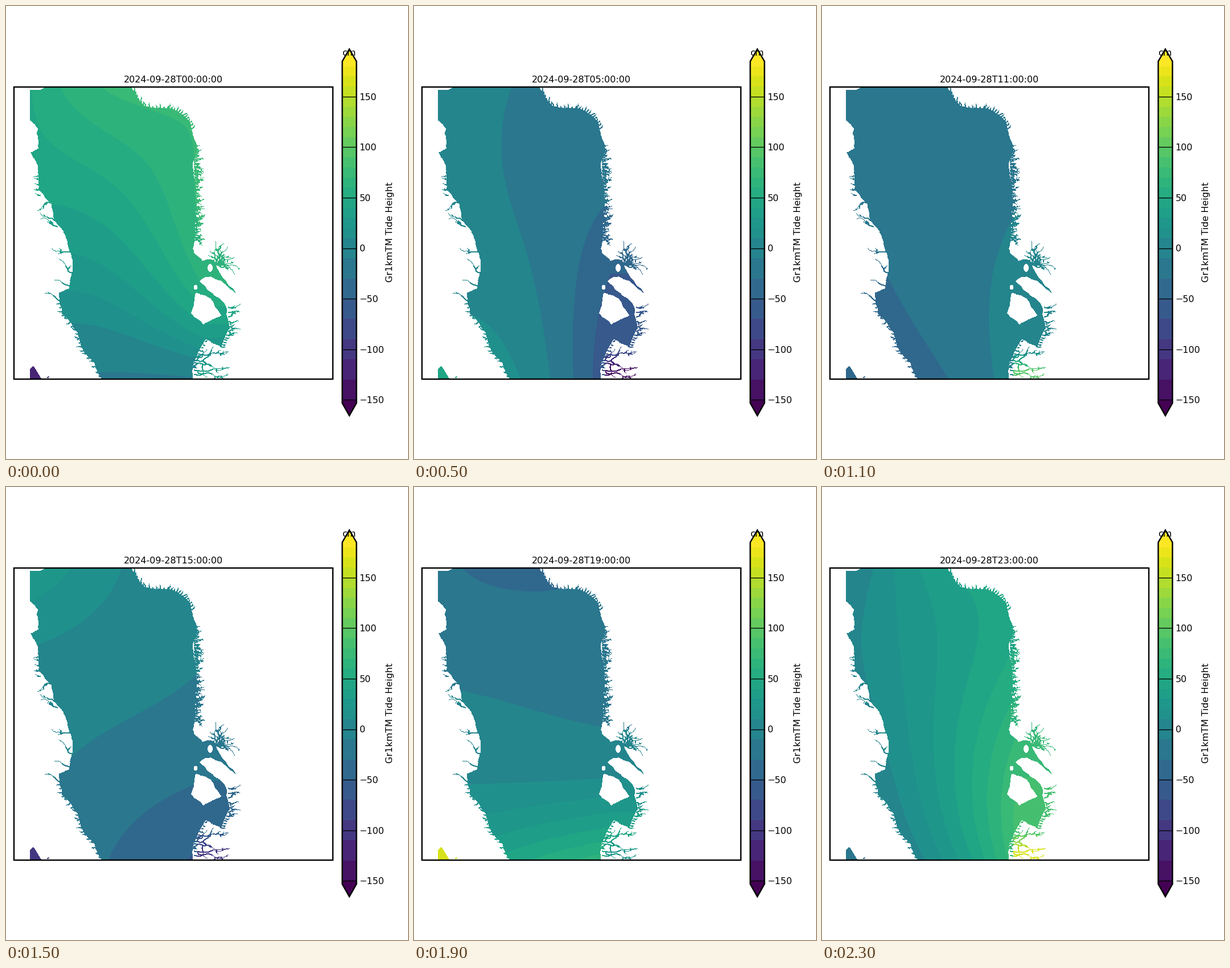
A matplotlib script that plays this animation: 706 px wide and 794 px high, repeating every 2.4 s.

```python
import numpy as np
import matplotlib.pyplot as plt
from matplotlib.animation import FuncAnimation
from matplotlib.patches import Polygon, Rectangle
from matplotlib.path import Path

W, H, DPI = 706, 794, 64
PT = 72 / DPI                       # points per pixel
X0, Y0, NX, NY = 42, 142, 376, 512  # sea raster on the stage
rng = np.random.default_rng(28)

# Wider steps below 10 cm
LEVELS = np.r_[-150:10:20, 10:181:10]
CENTRES = np.r_[-155, (LEVELS[:-1] + LEVELS[1:]) / 2, 185]
PALETTE = plt.get_cmap("viridis")((CENTRES + 155) / 340)

# Tide at three stations across by four down, from north to south
STATION_X, STATION_Y = (60, 190, 320), (150, 315, 480, 645)
TIDE = {
    0: [(53, 71, 74), (43, 50, 68), (24, 28, 54), (-6, -11, -7)],
    3: [(62, 44, 27), (29, 28, 22), (28, 9, -13), (45, -14, -78)],
    5: [(2, -12, -22), (2, -13, -25), (5, -6, -42), (25, 8, -54)],
    9: [(-57, -57, -41), (-45, -42, -40), (-33, -24, -24), (-12, -2, 16)],
    15: [(26, 11, 0), (6, 0, -8), (-6, -16, -24), (-12, -31, -49)],
    19: [(-27, -34, -28), (-14, -17, -22), (5, 3, 2), (25, 45, 60)],
    23: [(2, 33, 49), (8, 28, 50), (-2, 28, 68), (-12, 14, 68)],
}
HOURS = np.array(list(TIDE), float)
CORNER = -115, -80, 45, 95, -98, 160, -20   # south-west bay
SOUTH = 38, -135, -140, 92, -100, 28, 168   # south-east fjords

gx, gy = np.meshgrid(X0 + np.arange(NX) + .5, Y0 + np.arange(NY) + .5)


def lagrange(nodes, v):
    """Basis polynomials through the nodes, one row for each."""
    return np.array([np.prod([(v - b) / (a - b) for b in nodes if b != a], 0)
                     for a in nodes])


def tide_fields():
    across = lagrange(STATION_X, np.clip(gx[0], 45, 345))
    down = lagrange(STATION_Y, gy[:, 0])
    fields = np.einsum("krc,ry,cx->kyx", list(TIDE.values()), down, across)
    fade = np.clip((gy - 605) / 32, 0, 1) * (gx > 336)
    for z, south, corner in zip(fields, SOUTH, CORNER):
        z += fade * (south - z)
        z[(gx < 85) & (gy > 628)] = corner
    return fields


def harmonics(t):
    a, b = 2 * np.pi * t / 12.42, 2 * np.pi * t / 24
    return np.stack([np.ones_like(a), np.cos(a), np.sin(a),
                     np.cos(b), np.sin(b)], -1)


FIT = np.linalg.pinv(harmonics(HOURS))
REST = np.eye(len(HOURS)) - harmonics(HOURS) @ FIT


def weights(t):
    """Tidal harmonics plus the interpolated remainder."""
    rest = [np.interp(t, HOURS, col) for col in REST.T]
    return harmonics(np.float64(t)) @ FIT + rest


def rough(pts, amp=.05, depth=4):
    """Fractal coastline through a few points."""
    pts = np.array(pts, float)
    for _ in range(depth):
        d = np.diff(pts, axis=0)
        side = np.column_stack([-d[:, 1], d[:, 0]])
        mid = pts[:-1] + d / 2 + side * rng.normal(0, amp, (len(d), 1))
        out = np.empty((2 * len(pts) - 1, 2))
        out[::2], out[1::2] = pts, mid
        pts = out
    return pts


def inside(pts):
    pix = np.column_stack([gx.ravel(), gy.ravel()])
    return Path(pts).contains_points(pix).reshape(NY, NX)


def inlet(x, y, course, length, twigs=.1):
    """Wandering fjord that narrows and sends out side arms."""
    ang = course
    for k in range(int(length)):
        ang += rng.normal(0, .25) + .15 * (course - ang)
        x, y = x + np.cos(ang), y + np.sin(ang)
        i, j = int(y - Y0), int(x - X0)
        wide = 2 if k < length / 2 else 1
        if i >= 0 and j >= 0:
            sea[i:i + wide, j:j + wide] = True
        if rng.random() < twigs:
            inlet(x, y, ang + rng.choice([-.8, .8]), (length - k) / 2.5, 0)


west = [(41, 200), (56, 215), (57, 250), (43, 256), (56, 280), (60, 325),
        (80, 347), (86, 378), (104, 402), (117, 445), (117, 465), (111, 495),
        (93, 502), (98, 540), (127, 575), (142, 612), (168, 655)]
sound = [(328, 655), (329, 625), (352, 583), (378, 597), (393, 565),
         (387, 528), (370, 510), (340, 482), (350, 475), (384, 487),
         (405, 505), (374, 465), (366, 444), (345, 447), (330, 432)]
east = [(330, 432), (332, 380), (330, 300), (336, 250), (324, 203),
        (295, 181), (245, 176), (218, 140)]
west, sound, east = rough(west), rough(sound), rough(east)
sea = inside(np.vstack([[(72, 141), (60, 147), (41, 147)], west, sound, east]))

island = [(333, 503), (358, 512), (379, 542), (347, 558), (325, 538), (333, 503)]
sea &= ~inside(rough(island))
for x, y, w, h in ((358.5, 459, 4.5, 7), (333, 493, 3.5, 4)):
    sea &= np.hypot((gx - x) / w, (gy - y) / h) > 1

# Ragged shores
for y in np.arange(248, 412, 3):
    inlet(330, y, 0, rng.uniform(8, 21) + 10 * (abs(y - 370) < 5), .2)
for x, y in east[60::2]:
    inlet(x, y, np.arctan2(y - 270, x - 250), rng.uniform(3, 11))
for x, y in west[200::3]:
    inlet(x, y, np.pi, rng.uniform(3, 10))
for x, y in sound[12:60:2]:
    inlet(x, y, .4, rng.uniform(3, 9))

# Long fjords
for y in np.arange(296, 340, 9):
    inlet(60, y, np.pi, rng.uniform(9, 16))
for x, y, n in ((78, 345, 30), (85, 376, 30), (90, 386, 34), (112, 431, 35),
                (115, 467, 34), (112, 490, 30), (95, 517, 32)):
    inlet(x, y, np.pi - rng.uniform(-.3, .3), n, .04)
for ang in np.linspace(-1.55, .85, 8):
    inlet(367, 453, ang, rng.uniform(34, 50))
for y in np.linspace(528, 578, 7):
    inlet(390, y, -.15, rng.uniform(14, 25))
for y in np.linspace(614, 646, 5):
    inlet(330, y, rng.uniform(-.2, .15), 66, .06)

sea |= inside([(41, 655), (42, 637), (48, 631), (53, 638), (63, 655)])
inlet(72, 651, 0, 4, 0)

fields = tide_fields()
fig = plt.figure(figsize=(W / DPI, H / DPI), dpi=DPI, facecolor="white")
ax = fig.add_axes([0, 0, 1, 1])
ax.axis("off")


def label(x, y, s, **kw):
    return ax.text(x, y, s, family="DejaVu Sans", size=16 * PT, **kw)


def height(v):
    return 424.5 - 1.771 * v


img = ax.imshow(np.ones((NY, NX, 4)), extent=(X0, X0 + NX, Y0 + NY, Y0),
                interpolation="nearest", aspect="auto")
ax.add_patch(Rectangle((14, 142), 560, 512, fill=False, lw=2.4 * PT))
title = label(293.5, 134, "", ha="center", va="baseline")

# Colour bar
LEFT, RIGHT, MID, TOP, BASE = 590.5, 615.5, 603, 97, 696
TIP, FOOT = 75.5, 718
edges = [BASE, *height(LEVELS), TOP]
for lo, hi, c in zip(edges[:-1], edges[1:], PALETTE):
    ax.add_patch(Rectangle((LEFT, hi), RIGHT - LEFT, lo - hi, fc=c, lw=0,
                           antialiased=False))
for base, tip, c in ((TOP, TIP, PALETTE[-1]), (BASE, FOOT, PALETTE[0])):
    ax.add_patch(Polygon([(LEFT, base), (MID, tip), (RIGHT, base)], fc=c, lw=0))
ax.add_patch(Polygon([(LEFT, TOP), (MID, TIP), (RIGHT, TOP), (RIGHT, BASE),
                      (MID, FOOT), (LEFT, BASE)], fill=False, lw=2.4 * PT))
for v in range(-150, 151, 50):
    ax.plot([LEFT + 1, RIGHT - 1], [height(v)] * 2, color="black", lw=1.3 * PT)
    label(620.5, height(v), str(v).replace("-", "\u2212"),
          va="center_baseline")
label(602.5, 87, "cm", ha="center", va="baseline", zorder=5)
label(675, 396.5, "Gr1kmTM Tide Height", rotation=90, ha="center", va="center")
ax.set(xlim=(0, W), ylim=(H, 0))


def draw(hour):
    z = np.tensordot(weights(hour), fields, 1)
    rgba = PALETTE[np.digitize(z, LEVELS)]
    rgba[..., 3] = sea
    img.set_data(rgba)
    title.set_text(f"2024-09-28T{hour:02d}:00:00")
    return img, title


anim = FuncAnimation(fig, draw, frames=24, interval=100,
                     init_func=lambda: draw(0), repeat=True)
plt.show()
```
